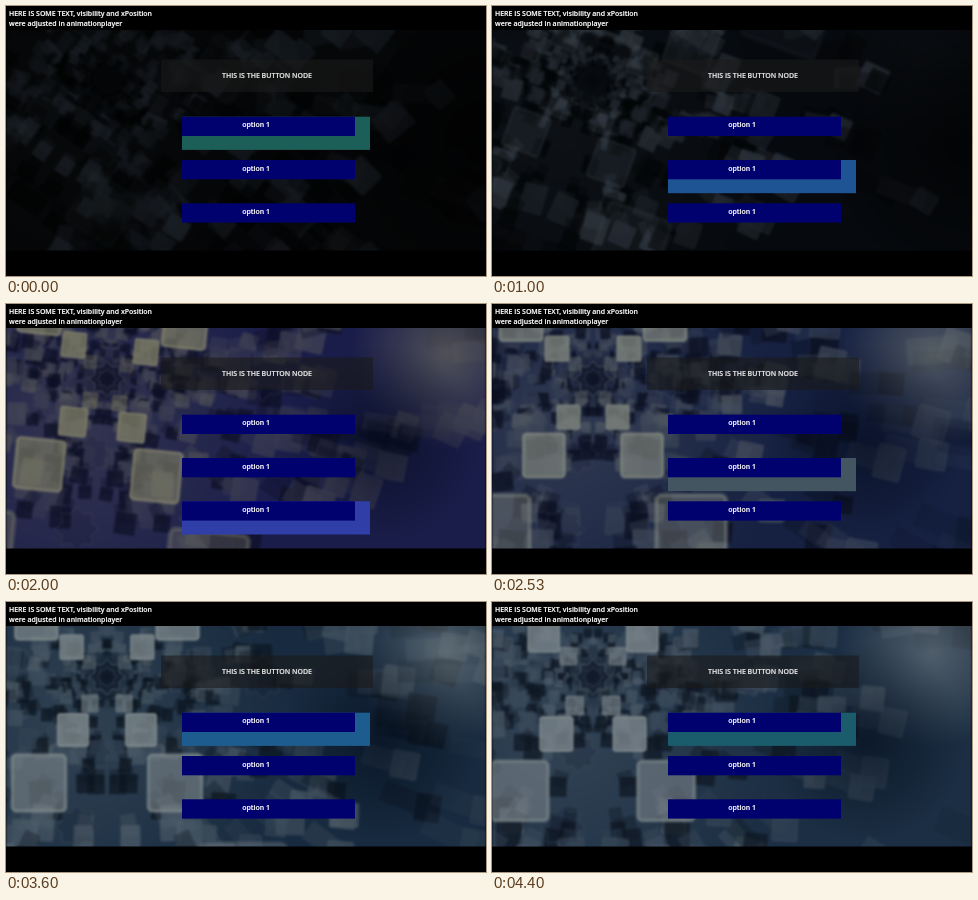
Write an HTML page with a canvas that moves like this. It is 480 px wide and 270 px high and loops after 4470 ms.

```html
<!DOCTYPE html>
<html lang="en">
<head>
<meta charset="utf-8">
<style>
  html, body { margin: 0; width: 100%; height: 100%; overflow: hidden; background: #000; }
  #stage { position: absolute; width: 480px; height: 270px; overflow: hidden; background: #000; }
  #scene { position: absolute; inset: 0; clip-path: inset(24px 0 25.5px 0); }
  canvas { display: block; filter: blur(0.9px); }
  svg { position: absolute; inset: 0; }
  text { font: 600 6.97px "Open Sans", "Noto Sans", sans-serif; fill: #fff; stroke: #fff; stroke-width: .2px; }
  .mid { text-anchor: middle; }
  .option { fill: #00006f; }
</style>
</head>
<body>
<div id="stage">
  <div id="scene"><canvas id="view" width="480" height="270"></canvas></div>
  <svg id="ui" width="480" height="270" viewBox="0 0 480 270">
    <rect x="155" y="53.5" width="212" height="32.5" rx="1.3" fill="#1a1a1a" fill-opacity=".6"/>
    <text class="mid" x="261" y="72.3" opacity=".9">THIS IS THE BUTTON NODE</text>
    <rect id="cursor" x="176" y="110.7" width="188" height="33.2"/>
    <text x="3" y="9.7">HERE IS SOME TEXT, visibility and xPosition</text>
    <text x="3" y="19.7">were adjusted in animationplayer</text>
  </svg>
</div>
<script>
const LOOP = 4470, STEP = 1000 / 15;
const CX = 101, CY = 75;
const TOP = 110.7, GAP = 43.3;

// Colours at even steps in time
const BASE  = ['#040506', '#06090d', '#1a1d49', '#12243b', '#1a2e42', '#1d2d45'];
const LIGHT = ['#2c343e', '#525d68', '#7b7a64', '#7d8990', '#7b8587', '#7a8490'];
const GLOW  = ['#1b5f58', '#1d5876', '#1e5394', '#27499e', '#303fa8',
               '#41585f', '#612479', '#1d5c92', '#1b5a80', '#1a5b67'];
// Moments at which the selection moves, and the row it moves to
const PICKS = [[0, 0], [500, 1], [1530, 2], [2330, 1], [2800, 0]];

const ctx = document.getElementById('view').getContext('2d');
const ui = document.getElementById('ui');
const cursor = document.getElementById('cursor');

const clamp = v => Math.max(0, Math.min(1, v));
const mod = (v, n) => ((v % n) + n) % n;
const rgb = hex => [1, 3, 5].map(i => parseInt(hex.slice(i, i + 2), 16));
const blend = (a, b, k) => a.map((v, i) => v + (b[i] - v) * k);
const css = (c, a = 1) => `rgba(${c.map(Math.round).join()},${a})`;

function colorAt(list, t, span) {
  const i = Math.min(Math.floor(t / span), list.length - 2);
  return blend(rgb(list[i]), rgb(list[i + 1]), clamp(t / span - i));
}

function random(seed) {
  return () => (seed = (seed * 16807) % 2147483647) / 2147483647;
}

const rnd = random(9173);
const blocks = Array.from({ length: 320 }, () => {
  const u = rnd() * 2 - 1;
  return {
    angle: Math.sign(u) * Math.abs(u) ** 1.3 * Math.PI / 2,
    phase: rnd() * 5, size: .22 + rnd() * .14, tall: .85 + rnd() * .4,
    tone: rnd(), turn: rnd() - .5
  };
});

for (let row = 0; row < 3; row++) {
  const y = TOP + row * GAP;
  ui.insertAdjacentHTML('beforeend',
    `<rect class="option" x="176" y="${y}" width="173" height="19.3"/>
     <text class="mid" x="250" y="${y + 10.6}">option 1</text>`);
}

function square(x, y, w, h, turn, fill, edge, alpha) {
  ctx.save();
  ctx.translate(x, y);
  ctx.rotate(turn);
  ctx.globalAlpha = alpha;
  ctx.fillStyle = fill;
  ctx.beginPath();
  ctx.roundRect(-w / 2, -h / 2, w, h, w * .08);
  ctx.fill();
  ctx.strokeStyle = edge;
  ctx.lineWidth = Math.max(.5, w * .06);
  ctx.stroke();
  ctx.restore();
}

function star(x, y, r, color, alpha) {
  ctx.beginPath();
  for (let i = 0; i < 16; i++) {
    const a = i * Math.PI / 8, d = i % 2 ? r * .72 : r;
    ctx.lineTo(x + d * Math.cos(a), y + d * Math.sin(a));
  }
  ctx.closePath();
  ctx.globalAlpha = alpha;
  ctx.fillStyle = 'rgba(0,8,20,.25)';
  ctx.fill();
  ctx.strokeStyle = color;
  ctx.lineWidth = .8;
  ctx.stroke();
  ctx.globalAlpha = 1;
}

function haze(x, y, r, color, alpha) {
  const g = ctx.createRadialGradient(x, y, 0, x, y, r);
  g.addColorStop(0, css(color, alpha));
  g.addColorStop(1, css(color, 0));
  ctx.fillStyle = g;
  ctx.fillRect(0, 0, 480, 270);
}

// Mirrored field of blocks flying out of the centre
function field(t, tilt, base, light) {
  const list = blocks.map(b => ({ ...b, depth: mod(b.phase + t * .0016, 5) }))
    .sort((a, b) => a.depth - b.depth);
  for (const b of list) {
    const r = 15 * 2 ** b.depth, s = r * b.size / (1 + r / 130);
    const alpha = clamp(b.depth) * clamp((5 - b.depth) * 2);
    const dark = b.tone < .4;
    const face = css(dark ? base.map(v => v * .5) : blend(base, light, b.tone * .55));
    const edge = css(blend(base, light, dark ? .15 : .5), .4);
    for (const side of [-1, 1]) {
      const a = tilt + side * b.angle + (side < 0 ? Math.PI : 0);
      const dx = r * Math.cos(a), dy = r * Math.sin(a);
      const x = CX + dx, y = CY + dy;
      if (x < -30 || x > 510 || y < 0 || y > 270) continue;
      // smeared body trailing towards the centre
      ctx.globalAlpha = alpha * .35;
      ctx.strokeStyle = face;
      ctx.lineWidth = s * .8;
      ctx.beginPath();
      ctx.moveTo(x, y);
      ctx.lineTo(CX + dx * .86, CY + dy * .86);
      ctx.stroke();
      const turn = tilt + b.turn * side * .25 + Math.max(0, dx) / 1500;
      square(x, y, s, s * b.tall, turn, face, edge, alpha * .7);
    }
  }
  ctx.globalAlpha = 1;
}

// Pairs of bright squares, one pair per doubling of the distance
function pairs(octave, angle, tilt, face, edge, alpha) {
  for (let k = 4; k < 9; k++) {
    const r = 2 ** (k + mod(octave, 1)), s = r * .56 / (1 + r / 400);
    const fade = alpha * clamp((r - 14) / 25) * clamp(1.25 - r / 260);
    for (const side of [-1, 1]) {
      const a = tilt + side * angle + (side < 0 ? Math.PI : 0);
      square(CX + r * Math.cos(a), CY + r * Math.sin(a), s, s * 1.05, tilt, face, edge, fade);
    }
  }
}

function drawScene(t) {
  const base = colorAt(BASE, t, 1000), light = colorAt(LIGHT, t, 1000);
  const calm = clamp((t - 900) / 900);
  const tilt = .6 * (1 - clamp(t / 2400));
  const face = css(light), edge = css(blend(light, [180, 180, 165], .15 * calm));

  ctx.fillStyle = css(base);
  ctx.fillRect(0, 0, 480, 270);
  haze(CX - 30, CY + 50, 220, light, .08 + .17 * calm);
  field(t, tilt, base, light);
  haze(440, 50, 95, light, .55 * calm);
  haze(375, 140, 100, [0, 8, 22], .55 * calm);
  haze(480, 135, 150, [0, 0, 0], .7 * (1 - calm));
  haze(CX, CY, 36, base.map(v => v * .5), .6);

  const line = css(blend(base, light, .6));
  for (let i = 0; i < 3; i++) {
    star(CX + i * 78, CY, 18 + i * 2, line, calm * (.8 - i * .2));
    star(CX - i * 15, CY + i * 75, 18 + i * 2, line, calm * .4);
  }
  star(CX, CY, 10, line, calm * .6);

  const s = t / 1000 - 2.53, alpha = .1 + .7 * calm;
  pairs(5.55 + 1.85 * s, -.7, tilt, face, edge, alpha);
  pairs(5.5 + 1.38 * s, 1, tilt, face, edge, alpha);
}

function draw(t) {
  drawScene(t);
  const row = PICKS.filter(p => p[0] <= t).pop()[1];
  cursor.setAttribute('y', TOP + row * GAP);
  cursor.setAttribute('fill', css(colorAt(GLOW, t, 500)));
}

const start = performance.now();
function tick() {
  const t = (performance.now() - start) % LOOP;
  draw(Math.floor(t / STEP + .06) * STEP);
  requestAnimationFrame(tick);
}
tick();
</script>
</body>
</html>
```
